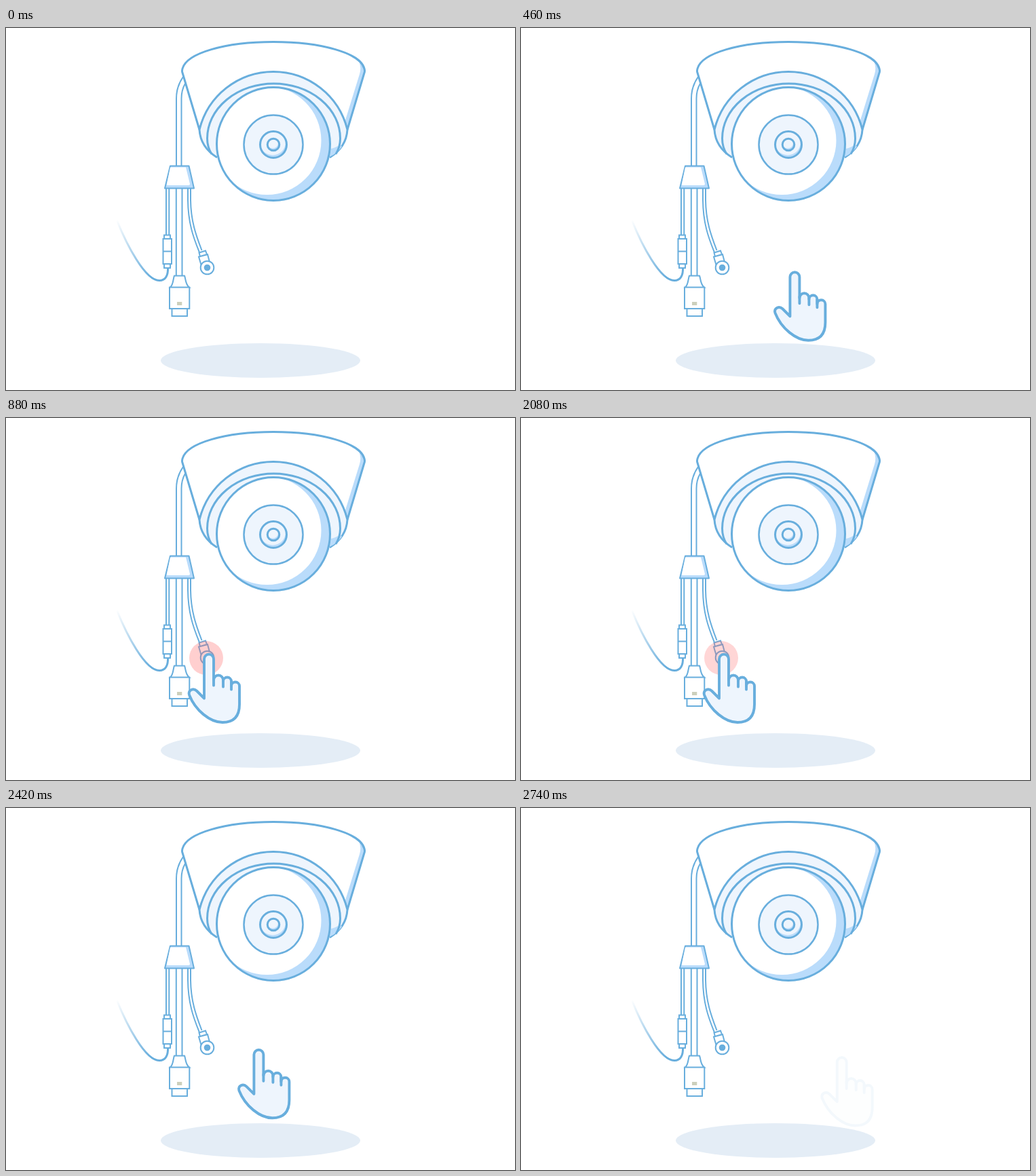
An HTML page for the animation above (3 s loop, 750 by 534 pixels).

```html
<!DOCTYPE html>
<html lang="en">
<head>
<meta charset="utf-8">
<title>Camera reset</title>
<style>
html, body { margin: 0; width: 100%; height: 100%; overflow: hidden; background: #fff; }
svg { display: block; width: 100%; height: 100%; }
.line { fill: none; stroke: #68aedd; stroke-width: 2; }
.bold { stroke-width: 3; }
.white { fill: #fff; }
.pale { fill: #eef5fd; }
.shade { fill: #badcfb; }
</style>
</head>
<body>
<svg viewBox="0 0 750 534">
  <defs>
    <linearGradient id="wireFade" gradientUnits="userSpaceOnUse" x1="163" y1="283" x2="212" y2="368">
      <stop offset="0" stop-color="#68aedd" stop-opacity="0"/>
      <stop offset="1" stop-color="#68aedd"/>
    </linearGradient>
    <clipPath id="ballClip"><circle cx="394" cy="171" r="83.5"/></clipPath>
    <clipPath id="lensClip"><circle cx="394" cy="172" r="19.5"/></clipPath>
    <clipPath id="pupilClip"><circle cx="394" cy="172" r="8.5"/></clipPath>
  </defs>

  <ellipse cx="375" cy="490.5" rx="147" ry="25.5" fill="#e4edf6"/>

  <g class="line">
    <path d="M261 72C254 82 251 92 251 104V203M264 82C260 89 258.5 96 258.5 104V203"/>
    <path d="M236 237V306M240.3 237V306M250.8 237V366M259.5 237V366"/>
    <path d="M268 237V252C268 287 276 309 285 331M272 237V252C272 284 280 306 288.5 328"/>
    <path class="shade" d="M242 203.5H269.5L277 236.5H234Z" stroke-linejoin="round"/>
    <path class="white" stroke="none" d="M242 205.5H265L271 230Q271 232 269 232H238Q236.500 232 237 230Z"/>
    <path stroke="url(#wireFade)" stroke-width="3" d="M238.500 354C239 365 235 372.5 226 372.5C205 372.5 178 320 163.500 284"/>
    <path class="white" d="M233 305.500H242V311H233ZM231.500 311H244V348H231.500ZM231.500 329.500H244M233 348H242V354H233Z"/>
    <path class="white" d="M248 365.500H263C265 370 264 378 270 382.500H242C247 378 246 370 248 365.500ZM241 382.500H270.300V414H241ZM244.500 414H267V425H244.500Z"/>
    <path class="white" d="M284.500 331.500L294 328.500L296 334L286 337ZM284 337.500L297 334L300.500 347L288 351Z"/>
    <circle class="white" cx="296.500" cy="353.500" r="9.800"/>
  </g>
  <rect x="252" y="404" width="7.300" height="5" fill="#cccfbc"/>
  <circle cx="296.500" cy="353.500" r="4.800" fill="#68aedd"/>

  <g class="line bold" stroke-linejoin="round">
    <path class="white" stroke="none" d="M260 64A134.500 43 0 0 1 528.500 64L503 150H285Z"/>
    <path class="shade" stroke="none" d="M513 41C526 49 530 56 528 65L503 152L500 136L521 68C524 58 522 49 513 41Z"/>
    <path class="pale" d="M311 191C295 181 286 168 285 150A112.200 112.200 0 0 1 503 150C502 168 493 181 477 191"/>
    <path class="shade" stroke="none" d="M477 190L479 178Q487 176 492 172L495 175Q488 185 477 190Z"/>
    <path d="M303 186C298 178 296.500 170 296.500 163A98 81 0 0 1 492.500 163C492.500 170 491 178 486 186"/>
    <path d="M285 150L260 66Q259 64 260 60C266 37 323 20.500 394 20.500S522 37 528 60Q529 64 528 66L503 150"/>
    <g stroke="none">
      <circle class="shade" cx="394" cy="171" r="83.500"/>
      <circle class="white" cx="384.500" cy="166" r="80" clip-path="url(#ballClip)"/>
    </g>
    <circle cx="394" cy="171" r="83.500"/>
    <circle class="pale" cx="394" cy="172" r="43.500" stroke-width="2.500"/>
    <g stroke="none">
      <circle class="shade" cx="394" cy="172" r="19.500"/>
      <circle class="pale" cx="393" cy="168.500" r="19" clip-path="url(#lensClip)"/>
    </g>
    <circle cx="394" cy="172" r="19.500"/>
    <g stroke="none">
      <circle class="shade" cx="394" cy="172" r="8.500"/>
      <circle class="pale" cx="393" cy="169.500" r="8" clip-path="url(#pupilClip)"/>
    </g>
    <circle cx="394" cy="172" r="8.800"/>
  </g>

  <circle id="glow" cx="295" cy="354" r="25" fill="#ff5a5a"/>
  <g id="hand" class="line" style="stroke-width:3.900" stroke-linecap="round" stroke-linejoin="round">
    <path class="pale" d="M-7 65V7A7 7 0 0 1 7 7V38A7 7 0 0 1 21 38V40A6 6 0 0 1 33 40V47A6 6 0 0 1 45 47V74C45 92 36 100.500 20 100.500C2 100.500 -20 83 -29 60C-31 53 -23 49 -18 54Z"/>
    <path d="M7 36V46M21 38V48M33 40V52"/>
  </g>
</svg>
<script>
const LOOP = 3000, STEP = 20, LAST_CHANGE = 2740;
const REST_X = 299, REST_Y = 348.5, SLOPE = 0.1125;
const hand = document.getElementById('hand');
const glow = document.getElementById('glow');

const ramp = (t, from, to) => Math.min(1, Math.max(0, (t - from) / (to - from)));
const ease = p => p * p * (3 - 2 * p);

function draw(ms) {
  const t = Math.min(LAST_CHANGE, Math.floor((ms % LOOP) / STEP) * STEP);
  const away = t < 1500
    ? 176 * (1 - ease(ramp(t, 180, 820)))
    : 189 * ease(ramp(t, 2080, 2880));
  hand.setAttribute('transform', `translate(${REST_X + away} ${REST_Y + away * SLOPE})`);
  hand.setAttribute('opacity', ramp(t, 120, 270) * (1 - ramp(t, 2600, 2751)));
  glow.setAttribute('opacity', 0.29 * ramp(t, 660, 880) * (1 - ramp(t, 2050, 2260)));
}

const start = performance.now();
function tick() {
  draw(performance.now() - start);
  requestAnimationFrame(tick);
}
tick();
</script>
</body>
</html>
```
